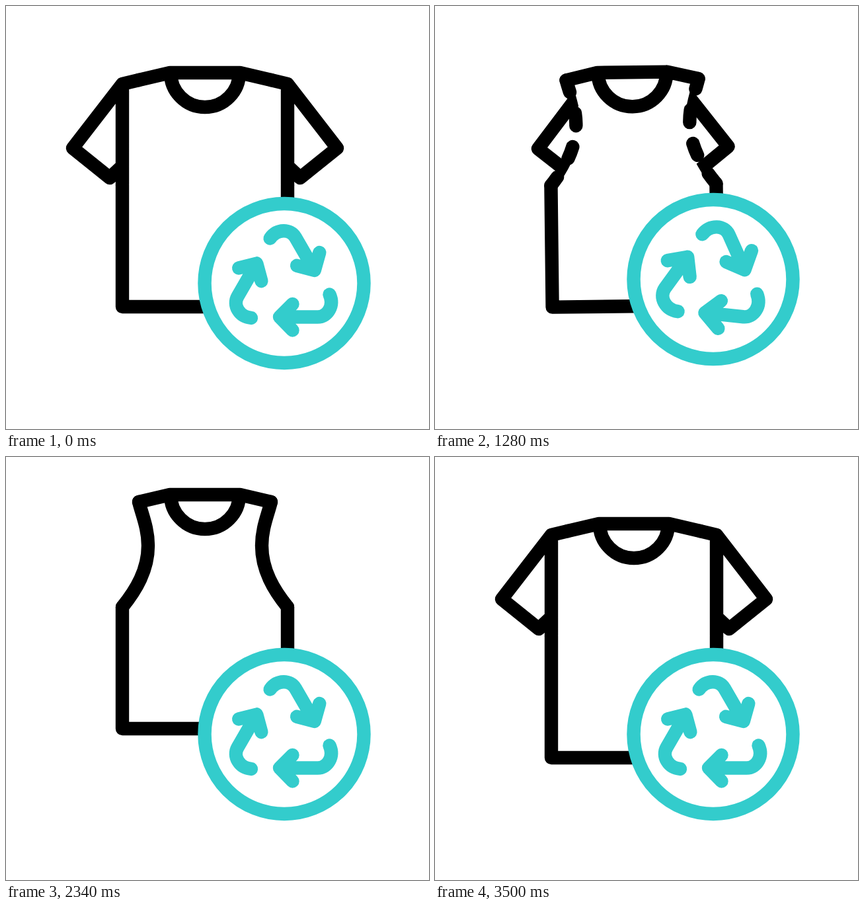
Write an HTML page that moves like this. It is 640 px wide and 640 px high and loops after 3600 ms.

```html
<!DOCTYPE html>
<html lang="en">
<head>
<meta charset="utf-8">
<title>Shirt recycling</title>
<style>
  html, body { margin: 0; width: 100%; height: 100%; overflow: hidden; background: #fff; }
  svg { display: block; width: 100vw; height: 100vh; }
  .line { fill: none; stroke: #000; stroke-width: 20.4; stroke-linecap: round; stroke-linejoin: round; }
  .teal { stroke: #3cc; }
</style>
</head>
<body>
<svg viewBox="0 0 640 640">
  <defs>
    <path id="sleeve" class="line" d="M201 112L176 118L101 215L157 260L176 242M176 118V271"/>
    <path id="arrow" class="line teal"/>
  </defs>
  <g id="shirt">
    <use id="sleeveL" href="#sleeve"/>
    <g transform="translate(602) scale(-1 1)"><use id="sleeveR" href="#sleeve"/></g>
    <path id="fill" fill="#fff" transform="translate(24.08) scale(.92 1)"/>
    <path id="seamL" class="line" pathLength="169"/>
    <path id="seamR" class="line" pathLength="169"/>
    <path class="line" d="M176 271V455H426V271M201 112L248 101H354L401 112M249 101A52 52 0 0 0 353 101"/>
  </g>
  <g id="badge">
    <circle cx="421" cy="419.5" r="120.5" fill="#fff" stroke="#3cc" stroke-width="20.5"/>
    <g id="arrows">
      <use href="#arrow"/>
      <use href="#arrow" transform="rotate(120)"/>
      <use href="#arrow" transform="rotate(240)"/>
    </g>
  </g>
</svg>
<script>
const LOOP = 3600, SEAM = 169, DASH = 19, PERIOD = 51;
const $ = id => document.getElementById(id);
const set = (id, name, value) => $(id).setAttribute(name, value);
const mix = (a, b, k) => a + (b - a) * k;

// Eased progress from 0 to 1 between two times
function ease(t, from, to) {
  const u = Math.min(1, Math.max(0, (t - from) / (to - from)));
  return u * u * (3 - 2 * u);
}

// Rises from 0 to 1 and returns to 0
function bump(t, from, to) {
  if (t <= from || t >= to) return 0;
  return Math.sin(Math.PI * (t - from) / (to - from)) ** 2;
}

// Eased track through [time, value] keys
function track(t, keys) {
  let v = keys[0][1];
  for (let i = 1; i < keys.length; i++) {
    v += (keys[i][1] - keys[i - 1][1]) * ease(t, keys[i - 1][0], keys[i][0]);
  }
  return v;
}

const seamDown = "C206 132 215 152 215 178C215 215 197 245 176 271";
const seamUp = "C405 245 387 215 387 178C387 152 396 132 401 112";
set("seamL", "d", "M201 112" + seamDown);
set("seamR", "d", "M426 271" + seamUp);
set("fill", "d", "M201 112" + seamDown + "V455H426V271" + seamUp + "L354 101H248Z");

// Visible stretches of the armhole seam
function seamParts(t) {
  if (t >= 1990) {
    const end = SEAM * (1 - ease(t, 2950, 3400));
    return end > 0.5 ? [[0, end]] : [];
  }
  const shown = SEAM * ease(t, 120, 720);
  const solid = SEAM * ease(t, 1460, 1990);
  const limit = Math.min(shown, SEAM - solid);
  const parts = [];
  for (let s = 0; s < limit; s += PERIOD) {
    const e = Math.min(s + DASH, limit);
    if (e - s > 0.5) parts.push([s, e]);
  }
  if (solid > 0.5) parts.push([SEAM - solid, SEAM]);
  return parts;
}

function drawSeams(t) {
  const parts = seamParts(t);
  const dashes = [];
  let at = 0;
  for (const [s, e] of parts) {
    if (s > 0) dashes.push(s - at);
    dashes.push(e - s);
    at = e;
  }
  dashes.push(SEAM * 2);
  for (const id of ["seamL", "seamR"]) {
    set(id, "visibility", parts.length ? "visible" : "hidden");
    set(id, "stroke-dasharray", dashes.map(n => n.toFixed(2)).join(" "));
  }
}

function drawShirt(t) {
  const turn = track(t, [[0, 0], [340, 9.5], [891, -16], [1336, 0]]) + 9.5 * bump(t, 2620, 3500);
  const sway = track(t, [[0, 0], [340, -15], [891, 7], [1336, 0]]);
  const lift = 44 * (ease(t, 1215, 1855) - ease(t, 2560, 3200));
  const slide = 120 * (ease(t, 1080, 1500) - ease(t, 2600, 3000));
  set("shirt", "transform", `translate(0 ${sway - lift}) rotate(${turn} 320 320)`);
  set("sleeveL", "x", slide);
  set("sleeveR", "x", slide);
}

function drawBadge(t) {
  const lift = 34 * (ease(t, 1120, 1725) - ease(t, 2000, 2320));
  const turn = 120 * ease(t, 1200, 1900);
  const k = bump(t, 1200, 1900);
  const pt = (x, y, x2, y2) => `${mix(x, x2, k)} ${mix(y, y2, k)} `;
  const tip = pt(-6, 50.5, -17, 51);
  set("arrow", "d",
    "M" + pt(69.5, 16.5, 65, 12.5) +
    "C" + pt(77, 33, 80, 36) + pt(67, 50.5, 70, 64) + pt(51.5, 50.5, 47, 63) + "L" + tip +
    "M" + pt(13.5, 31, 30, 28) + "L" + tip + "L" + pt(13.5, 70.5, 20, 86.5));
  set("arrows", "transform", `translate(${420 - 2.5 * k} ${420 + 2.5 * k}) rotate(${turn})`);
  set("badge", "transform", `translate(0 ${-lift})`);
}

function draw(t) {
  drawShirt(t);
  drawSeams(t);
  drawBadge(t);
}

const start = performance.now();
function frame() {
  draw((performance.now() - start) % LOOP);
  requestAnimationFrame(frame);
}
draw(0);
requestAnimationFrame(frame);
</script>
</body>
</html>
```
